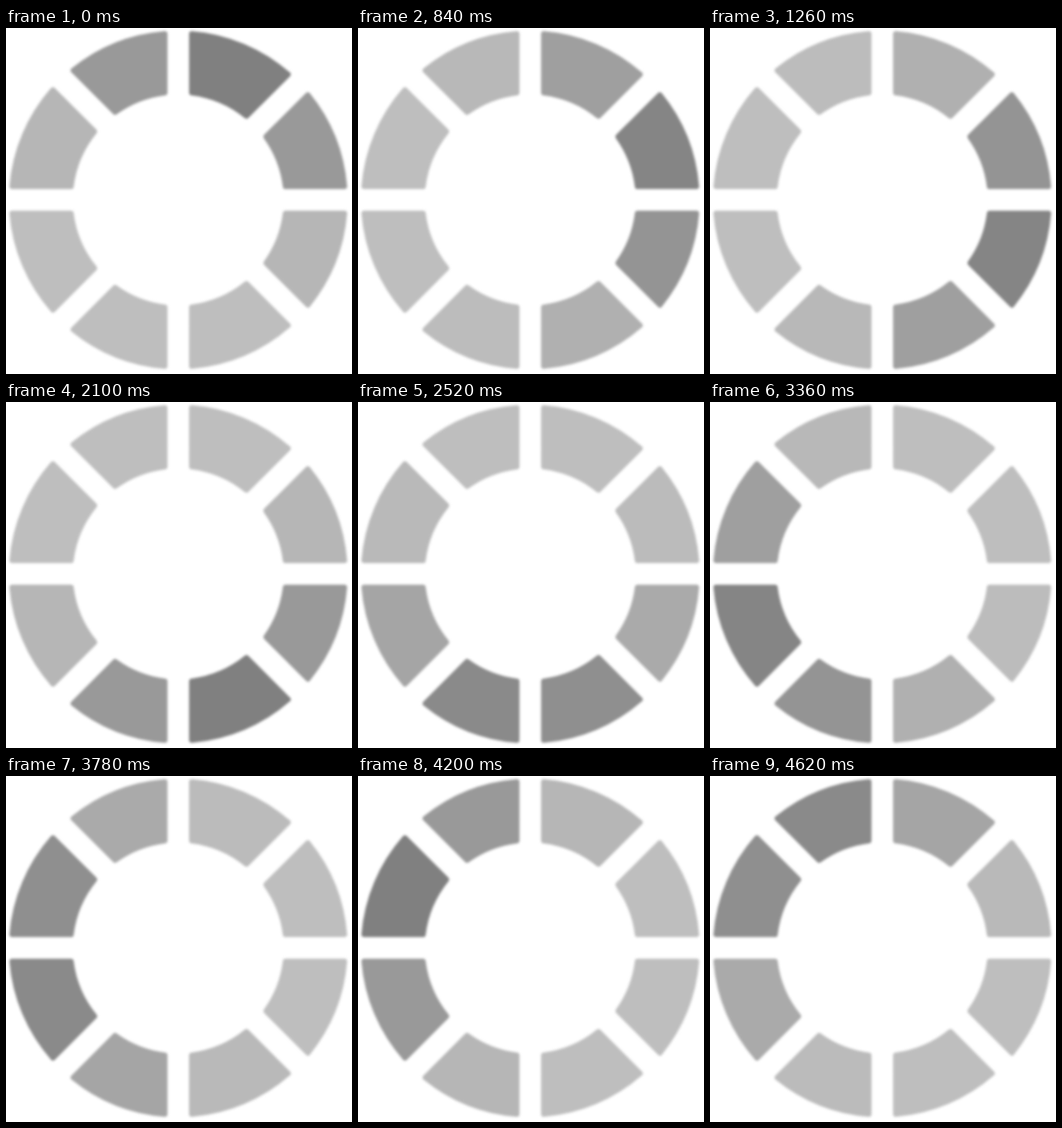
Recreate the animation shown at these times as an HTML page. Size 384 by 384 pixels, loop 5.6 s.

```html
<!DOCTYPE html>
<html lang="en">
<head>
<meta charset="utf-8">
<title>Loading ring</title>
<style>
  html, body { margin: 0; width: 100%; height: 100%; overflow: hidden; background: #fff; }
  svg { display: block; width: 100%; height: 100%; }
</style>
</head>
<body>
<svg viewBox="0 0 384 384">
  <defs>
    <filter id="soft" x="0" y="0" width="384" height="384" filterUnits="userSpaceOnUse" color-interpolation-filters="sRGB">
      <feGaussianBlur stdDeviation="1.6"/>
    </filter>
  </defs>
  <g id="ring" filter="url(#soft)" stroke-width="6" stroke-linejoin="round"></g>
</svg>
<script>
const LOOP = 5600, STEP = 420, LAST = 11, COUNT = 8;
const CX = 191.2, CY = 190.8, INNER = 117, OUTER = 188;
const INSET = 3, AXIS_GAP = 12;
// half gap beside the diagonal, per segment, clockwise from the top
const DIAGONAL_GAP = [9.3, 16.3, 16.3, 9.3, 16.3, 9.1, 9.1, 16.3];
// grey level by distance from the dark head, in segments
const GREYS = [128, 153, 182, 190, 190, 190];

function point(r, angle) {
  return (CX + r * Math.sin(angle)).toFixed(2) + ' ' + (CY - r * Math.cos(angle)).toFixed(2);
}

function segmentPath(k) {
  const from = k * Math.PI / 4, to = from + Math.PI / 4;
  const gaps = [AXIS_GAP + INSET, DIAGONAL_GAP[k] + INSET];
  if (k % 2) gaps.reverse();
  const start = r => point(r, from + Math.asin(gaps[0] / r));
  const end = r => point(r, to - Math.asin(gaps[1] / r));
  const ro = OUTER - INSET, ri = INNER + INSET;
  return `M${start(ro)}A${ro} ${ro} 0 0 1 ${end(ro)}L${end(ri)}A${ri} ${ri} 0 0 0 ${start(ri)}Z`;
}

function grey(distance) {
  const i = Math.floor(distance);
  return Math.round(GREYS[i] + (GREYS[i + 1] - GREYS[i]) * (distance - i));
}

const ring = document.getElementById('ring');
const segments = Array.from({ length: COUNT }, (_, k) => {
  const path = document.createElementNS('http://www.w3.org/2000/svg', 'path');
  path.setAttribute('d', segmentPath(k));
  return ring.appendChild(path);
});

function draw(time) {
  const step = Math.min(LAST, Math.floor((time % LOOP) / STEP));
  const head = step * STEP * COUNT / LOOP;
  segments.forEach((path, k) => {
    const gap = Math.abs(k - head);
    const level = grey(Math.min(gap, COUNT - gap));
    const color = `rgb(${level},${level},${level})`;
    path.setAttribute('fill', color);
    path.setAttribute('stroke', color);
  });
}

function tick(now) {
  draw(now);
  requestAnimationFrame(tick);
}

draw(0);
requestAnimationFrame(tick);
</script>
</body>
</html>
```
